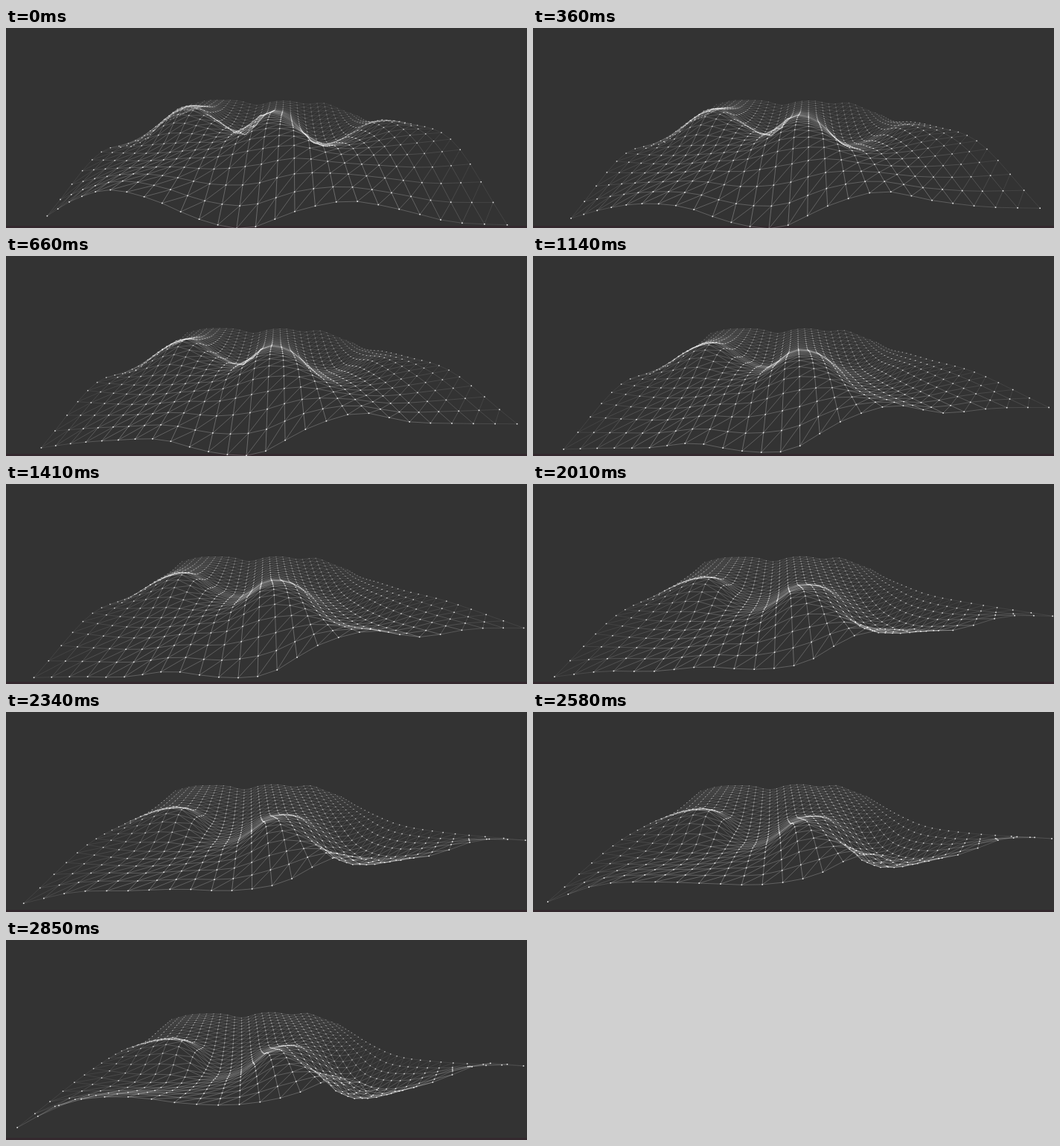
An HTML page with a canvas for the animation above (2.88 s loop, 700x270 px).

```html
<!DOCTYPE html>
<html lang="en">
<head>
<meta charset="utf-8">
<title>Wire terrain</title>
<style>
html, body { margin: 0; width: 100%; height: 100%; overflow: hidden; background: #333; }
canvas { display: block; }
</style>
</head>
<body>
<canvas id="stage" width="700" height="270"></canvas>
<script>
const ctx = document.getElementById('stage').getContext('2d');
const LOOP = 2880, STEP = 30, CELLS = 25, HALF = CELLS / 2;
const FOCAL = 326, DIST = 24, PITCH = 0.311;
const SIN = Math.sin(PITCH), COS = Math.cos(PITCH);
const MID = 1.14, END = 2.85;

// Heights across the mesh; the near edge has a middle pose, the far edge is still
const NEAR = [
  [-1.55, -.3, .4, -.05, -1.1, -1.5, -.3, .45, .15, -.4, -.4],
  [-1.15, -1.05, -1, -.7, -1.15, -1.05, .63, 1.55, 1.16, 1.45, 1.5],
  [.2, 1.4, 1.5, 1, .8, 1.15, 2, 1.1, 1.5, 2.4, 2.2]
];
const BEFORE = [
  [.2, .2, .3, .6, .9, 1.7, 1.9, 1.15, 1.25, 1.6, 2],
  [-1, 1, 2.4, 1.6, .4, 2, 1.3, -.7, .2, 1.7, 1.5],
  [-.5, 1.1, 1.5, -.5, -1.6, 1, .4, -2.1, -1.9, -.2, .4]
];
const AFTER = [
  [.4, -.2, -.4, -.55, -.2, 1.5, .2, -2, -2.2, -.8, .3],
  [.2, .9, .9, -1.9, -1.7, -.2, .1, -1.5, -3.4, -2.7, -1.2],
  [-.6, -.3, -.8, -1.9, -2, -1.5, -1.3, -1.1, -2.2, -2.3, -1.7]
];
const FAR = [-.5, .1, .2, .1, -.5, .1, .2, -.2, 0, -.9, -1.8];

const mix = (a, b, f) => a.map((v, i) => v + (b[i] - v) * f);

function controls(t) {
  const f = t / END;
  const w0 = (t - MID) * (t - END) / (MID * END);
  const w1 = t * (t - END) / (MID * (MID - END));
  const w2 = t * (t - MID) / (END * (END - MID));
  const near = NEAR[0].map((v, i) => w0 * v + w1 * NEAR[1][i] + w2 * NEAR[2][i]);
  const hills = BEFORE.map((row, i) => mix(row, AFTER[i], f));
  const slope = mix(hills[2], FAR, 0.5).map(v => v - 0.5 * (1 - f));
  return [near, ...hills, slope, FAR];
}

// Smooth curve through evenly spaced values
function spline(v, p) {
  const last = v.length - 1;
  const i = Math.min(Math.floor(p), last - 1), f = p - i;
  const b = v[i], c = v[i + 1];
  const a = i > 0 ? v[i - 1] : 2 * b - c;
  const d = i + 2 <= last ? v[i + 2] : 2 * c - b;
  return b + f * (c - a + f * (2 * a - 5 * b + 4 * c - d + f * (3 * (b - c) + d - a))) / 2;
}

function expand(table) {
  const wide = table.map(row => Array.from({ length: CELLS + 1 }, (_, c) => spline(row, c / 2.5)));
  return Array.from({ length: CELLS + 1 }, (_, r) =>
    wide[0].map((_, c) => spline(wide.map(row => row[c]), r / 5)));
}

function project(c, r, h, t) {
  const turn = -0.085 + 0.063 * t;
  const x = c - HALF, n = HALF - r;
  let X = x * Math.cos(turn) + n * Math.sin(turn);
  const N = n * Math.cos(turn) - x * Math.sin(turn);
  X += 1.2 * (1 - t / END) * Math.max(0, 1 - c / 12) ** 2 * (1 - r / CELLS);
  if (X > 0) X *= 0.98;
  const scale = FOCAL / (DIST - N * COS - h * SIN);
  return { x: 350 + X * scale, y: 135 + (N * SIN - h * COS) * scale };
}

function draw(t) {
  ctx.globalAlpha = 1;
  ctx.fillStyle = '#333';
  ctx.fillRect(0, 0, 700, 270);
  ctx.fillStyle = '#34292e';
  ctx.fillRect(0, 267, 700, 3);

  const mesh = expand(controls(t)).map((row, r) => row.map((h, c) => project(c, r, h, t)));
  const far = 0.13 + 0.04 * t;
  const fade = (c, r) => {
    const side = Math.min(1, 0.3 + Math.min(c, CELLS - c) / 7);
    return (0.44 + (far - 0.44) * r / CELLS) * side;
  };
  const link = (c, r, dc, dr, strength) => {
    if (c + dc > CELLS || r + dr > CELLS) return;
    const a = mesh[r][c], b = mesh[r + dr][c + dc];
    ctx.globalAlpha = fade(c + dc / 2, r + dr / 2) * strength;
    ctx.beginPath();
    ctx.moveTo(a.x, a.y);
    ctx.lineTo(b.x, b.y);
    ctx.stroke();
  };
  ctx.strokeStyle = ctx.fillStyle = '#fff';
  ctx.lineWidth = 0.7;
  for (let r = CELLS; r >= 0; r--) {
    for (let c = 0; c <= CELLS; c++) {
      link(c, r, 1, 0, 0.75);
      link(c, r, 0, 1, 0.9);
      link(c, r, 1, 1, 0.75);
      const p = mesh[r][c], size = 1.6 - 0.6 * r / CELLS;
      ctx.globalAlpha = 0.9 + (far * 1.8 - 0.9) * r / CELLS;
      ctx.fillRect(p.x - size / 2, p.y - size / 2, size, size);
    }
  }
}

const start = performance.now();
let shown = -1;
function tick() {
  const ms = Math.max(0, performance.now() - start) % LOOP;
  const step = Math.floor(ms / STEP);
  if (step !== shown) {
    shown = step;
    draw(step * STEP / 1000);
  }
  requestAnimationFrame(tick);
}
tick();
</script>
</body>
</html>
```
